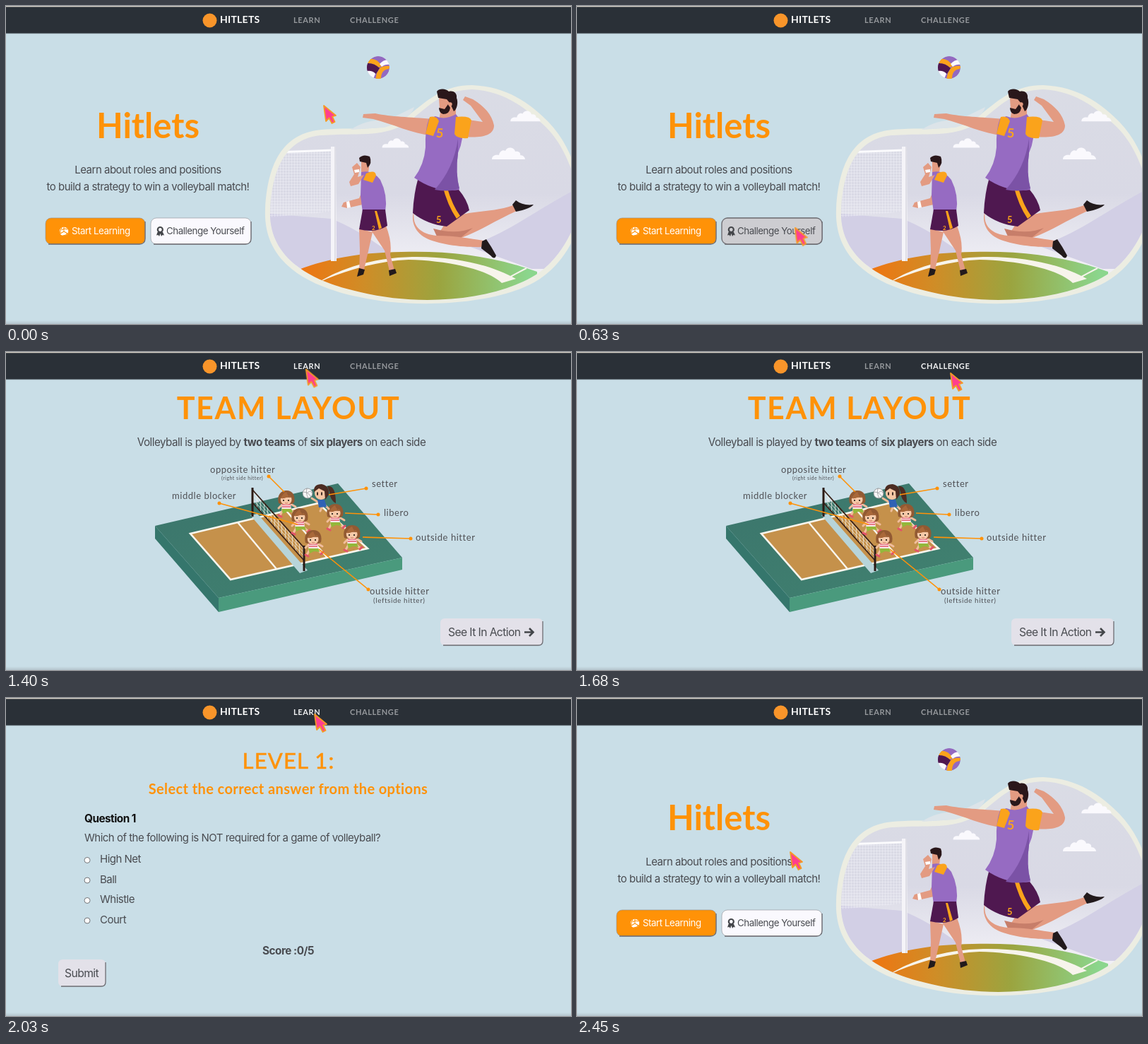
An HTML page for the animation above (2.52 s loop, 800 by 450 pixels).

```html
<!DOCTYPE html>
<html lang="en">
<head>
<meta charset="utf-8">
<title>Volleyball trainer</title>
<style>
html, body { margin: 0; width: 100%; height: 100%; overflow: hidden; background: #c9dee7; }
svg { display: block; width: 100%; height: 100%; }
text { font: 15px Inter, sans-serif; letter-spacing: -.5px; fill: #494b50; white-space: pre; }
.mid { text-anchor: middle; }
.bold, tspan { font-weight: 700; }
.btn { font-size: 13.3px; letter-spacing: -.45px; }
.big { font-size: 15.7px; letter-spacing: -.6px; }
.box { stroke: #8c8c90; stroke-width: .6; }
.edge { fill: none; stroke: #6d6c72; stroke-width: 1.3; }
.head { font-family: Lato, sans-serif; fill: #ff9208; text-anchor: middle; }
.link { font: 700 11px Lato, sans-serif; letter-spacing: .6px; fill: #95989c; }
.label text { font: 13px Lato, sans-serif; letter-spacing: .55px; fill: #505156; }
.label .s { font-size: 10px; }
.label .xs { font-size: 7px; letter-spacing: .45px; }
.skin { fill: #e39b82; }
.jersey { fill: #966bc2; }
.shorts { fill: #4f1850; }
.gold { fill: #fba31b; }
.shoe { fill: #221a1c; }
.hair { fill: #2a171a; }
.num { font: 700 18px Lato, sans-serif; fill: #fba31b; }

.page, .link, #hot, #arrow { animation: 2520ms step-end infinite; }
#home { animation-name: home; }
#quiz { animation-name: quiz; }
#team { animation-name: team; }
#hot { animation-name: hot; }
#learn { animation-name: learn; }
#challenge { animation-name: challenge; }
#arrow { animation-name: arrow; }
@keyframes home { 0%, 94.44% { visibility: visible } 27.77% { visibility: hidden } 100% { visibility: visible } }
@keyframes quiz { 0%, 52.77%, 86.11%, 100% { visibility: hidden } 27.77%, 72.22% { visibility: visible } }
@keyframes team { 0%, 72.22%, 94.44%, 100% { visibility: hidden } 52.77%, 86.11% { visibility: visible } }
@keyframes hot { 0%, 27.77%, 100% { opacity: 0 } 11.11% { opacity: 1 } }
@keyframes learn { 0%, 63.88%, 88.88%, 100% { fill: #95989c } 47.22%, 80.55% { fill: #f1f2f3 } }
@keyframes challenge { 0%, 77.77%, 100% { fill: #95989c } 66.66% { fill: #f1f2f3 } }
/* each leg advances once per 70 ms */
@keyframes arrow {
  0% { transform: translate(450px, 141px); animation-timing-function: steps(2) }
  5.55% { transform: translate(386px, 246px); animation-timing-function: steps(3) }
  13.88% { transform: translate(314px, 337px); animation-timing-function: steps(3) }
  22.22% { transform: translate(311px, 332px); animation-timing-function: steps(2) }
  27.77% { transform: translate(306px, 295px); animation-timing-function: steps(5) }
  41.66% { transform: translate(286px, 149px); animation-timing-function: steps(2) }
  47.22% { transform: translate(420px, 24px); animation-timing-function: steps(5) }
  61.11% { transform: translate(428px, 25px); animation-timing-function: steps(2) }
  66.66% { transform: translate(529px, 30px); animation-timing-function: steps(3) }
  75% { transform: translate(523px, 27px); animation-timing-function: steps(2) }
  80.55% { transform: translate(437px, 23px); animation-timing-function: steps(2) }
  86.11% { transform: translate(432px, 23px); animation-timing-function: steps(2) }
  91.66% { transform: translate(310px, 23px); animation-timing-function: steps(2) }
  97.22% { transform: translate(302px, 218px) }
  100% { transform: translate(450px, 141px) }
}
</style>
</head>
<body>
<svg viewBox="0 0 800 450" preserveAspectRatio="none">
<defs>
  <linearGradient id="floor" x1="408" x2="740" gradientUnits="userSpaceOnUse">
    <stop stop-color="#f2730f"/><stop offset=".3" stop-color="#cf8d27"/>
    <stop offset=".62" stop-color="#9ba43f"/><stop offset="1" stop-color="#8bd68d"/>
  </linearGradient>
  <linearGradient id="sky" x2="0" y2="1">
    <stop stop-color="#dadce5"/><stop offset=".5" stop-color="#d9d9e5"/><stop offset=".8" stop-color="#f0eff5"/>
  </linearGradient>
  <linearGradient id="foot" x2="0" y2="1">
    <stop stop-color="#c9dee7"/><stop offset="1" stop-color="#b4c4cc"/>
  </linearGradient>
  <linearGradient id="slab" x2="1" y2="1">
    <stop stop-color="#3b756c"/><stop offset="1" stop-color="#418270"/>
  </linearGradient>
  <pattern id="mesh" width="4" height="4" patternUnits="userSpaceOnUse">
    <path d="M0 0H4M0 0V4" stroke="#f3f3f8" stroke-width=".9"/>
  </pattern>
  <pattern id="cord" width="5" height="5" patternUnits="userSpaceOnUse" patternTransform="skewY(48)">
    <path d="M0 0H5M0 0V5" stroke="#f2f0e8" stroke-width="1.3"/>
  </pattern>
  <clipPath id="inner"><path d="M374 288C378 214 407 186 447 183 502 179 539 188 575 160 603 137 622 119 660 118 704 120 736 144 762 169 784 190 794 214 802 235V316C789 346 768 371 744 384 681 419 580 424 502 405 423 388 371 352 374 288Z"/></clipPath>
  <clipPath id="disc"><circle r="16"/></clipPath>
  <path id="cloud" d="M-23 8C-23 2-17 1-13 2-12-4-7-6-4-4-1-11 9-9 10-3 16-4 18 0 17 2 21 2 24 5 24 8Z" fill="#faf9fd"/>
  <g id="girl">
    <path d="M-4 10-9 19M4 10 12 17M-6 4-11 9M6 3 13 7" stroke="#f1bd9c" stroke-width="3" stroke-linecap="round"/>
    <path d="M-11 19-7 21M11 18 14 15" stroke="#e2526a" stroke-width="3" stroke-linecap="round"/>
    <path d="M-6 2H6L7 12H-7Z" fill="#f7e9e8"/>
    <path d="M-6 4H6M-6 7H6" stroke="#e5566f" stroke-width="1.5"/>
    <path d="M-7 10H7L9 15 1 14-5 17Z" fill="#93b83a"/>
    <path d="M-11 2C-14-9-8-16 0-16 9-16 13-9 11 1L8 3H-8Z" fill="#925a33"/>
    <path d="M-8-5Q0-7 7-6C9 0 5 4 0 4-6 4-9 0-8-5Z" fill="#f6c9a8"/>
    <path d="M-8-5Q-5-12 0-14 2-7 9-5L5-9Q-1-4-8-5Z" fill="#a9683a"/>
    <circle cx="-4" cy="-2" r="1"/><circle cx="3" cy="-2" r="1"/>
    <path d="M-2 1.5Q0 3 2 1.5" fill="none" stroke="#c75b50" stroke-width=".8"/>
  </g>
</defs>

<rect width="800" height="450" fill="#c9dee7"/>
<rect y="445" width="800" height="5" fill="url(#foot)"/>
<rect width="800" height="39.5" fill="#9fb0b8"/>
<rect width="800" height="38.6" fill="#2a3037"/>
<rect width="800" height="1.3" fill="#dcd7cd"/>
<circle cx="288.5" cy="20.5" r="10" fill="#f9952a"/>
<text x="303" y="24" class="link" style="font-size:14px;fill:#fff;letter-spacing:.25px;animation:none">HITLETS</text>
<text x="407" y="23.5" class="link" id="learn">LEARN</text>
<text x="487" y="23.5" class="link" id="challenge">CHALLENGE</text>

<g id="home" class="page">
  <text x="201" y="187" class="head bold" style="font-size:49px;letter-spacing:0">Hitlets</text>
  <text x="201" y="237" class="mid">Learn about roles and positions</text>
  <text x="201" y="260.5" class="mid">to build a strategy to win a volleyball match!</text>

  <rect class="box" x="56" y="300" width="141" height="37" rx="8" fill="#ff9207"/>
  <path class="edge" d="M60 337H189Q197 337 197 329V305"/>
  <circle cx="82" cy="319" r="6.2" fill="#fff"/>
  <path d="M82 319V313M82 319 77 322M82 319 87 322M79 314Q76 318 77 322M87 316Q82 314 79 317M80 325Q86 325 87 321" fill="none" stroke="#ff9207" stroke-width="1.1"/>
  <text x="93" y="323.3" class="btn" style="fill:#fff">Start Learning</text>

  <rect class="box" x="205" y="300" width="142" height="37" rx="8" fill="#faf9fe"/>
  <path class="edge" d="M209 337H339Q347 337 347 329V305"/>
  <g id="hot" opacity="0">
    <rect x="205" y="300" width="142" height="37" rx="8" fill="#cdcdd1"/>
    <rect class="edge" x="205" y="300" width="142" height="37" rx="8"/>
  </g>
  <path d="M214.5 320 213 324.5 215.5 324 217 326 218.5 322 220 326 221.5 324 224 324.5 222 320Z" fill="#44464a"/>
  <circle cx="218.3" cy="316.5" r="3.5" fill="none" stroke="#44464a" stroke-width="2.2"/>
  <text x="227" y="323.3" class="btn">Challenge Yourself</text>

  <path d="M367 288C371 207 403 179 447 175 501 170 535 182 571 154 601 130 621 112 660 112 710 114 742 138 768 164 790 187 800 211 808 235V318C796 351 773 377 748 391 684 426 566 427 501 412 417 395 364 357 367 288Z" fill="#ecede2"/>
  <path d="M488 175Q510 160 540 161 554 155 578 143 574 160 536 172Z" fill="#dce4e9"/>
  <g clip-path="url(#inner)">
    <path d="M360 100H810V430H360Z" fill="url(#sky)"/>
    <path d="M360 293 460 301Q500 316 552 356L360 382Z" fill="#d2cfe5"/>
    <path d="M810 258C750 288 715 320 655 340L744 372H810Z" fill="#d2cfe5"/>
    <path d="M392 382C455 354 510 349 560 348 630 346 690 354 752 376V430H392Z" fill="url(#floor)"/>
    <path d="M441 392C480 367 530 356 575 355 640 354 690 368 722 386L702 392C680 371 620 360 570 359 525 361 480 374 441 392Z" fill="#f7f4ec"/>
    <path d="M703 389 737 371" stroke="#f7f4ec" stroke-width="2"/>
    <path d="M380 207 462 204V291L372 299Z" fill="url(#mesh)"/>
    <path d="M382 207 463 204" stroke="#fbfbfd" stroke-width="3"/>
    <path d="M460 199H467L468 361H460Z" fill="#f5f4f8"/>
    <path d="M466 199V361" stroke="#c9c9d4"/>
  </g>
  <use href="#cloud" transform="translate(551 194) scale(.8)"/>
  <use href="#cloud" x="711" y="209"/>
  <use href="#cloud" transform="translate(735 156) scale(.9)"/>

  <g transform="translate(527 87)" clip-path="url(#disc)">
    <circle r="16" fill="#9369c0"/>
    <path d="M-13-12Q-2-14 5-2L0 0Q-5-6-15-6Z" fill="#fba31b"/>
    <path d="M-16-6Q-6-7 2 1L-3 9Q-9 4-16 6Z" fill="#4f1850"/>
    <path d="M-16 5Q-8 4-4 9L-7 16-16 14Z" fill="#fbfafd"/>
    <path d="M-2 8 3 0Q9-3 17-2L15 2Q4 3 4 16L-4 17Z" fill="#fba31b"/>
    <path d="M2-5Q8-12 16-11L17-4Q10-5 5-1Z" fill="#fbfafd"/>
  </g>

  <!-- near player -->
  <path class="skin" d="M623 306C650 286 682 295 718 282L723 290C694 303 670 319 645 328L610 326Z"/>
  <path d="M605 315Q637 324 661 314L640 331 610 326Z" fill="#c77e6a"/>
  <path class="skin" d="M578 290C574 312 588 323 610 325 638 325 656 329 676 332L677 341C649 342 613 338 594 328 577 319 573 301 578 290Z"/>
  <path class="shoe" d="M717 281 722 275Q732 283 747 281 742 287 722 291Z"/>
  <path class="shoe" d="M674 333 680 330Q687 340 694 353 692 360 686 353L673 343Z"/>
  <path class="shorts" d="M584 242 641 260Q653 274 656 289L624 312Q596 309 576 293 577 267 584 242Z"/>
  <path class="gold" d="M618 254 625 258Q632 282 643 297L638 301Q625 282 618 254Z"/>
  <path class="skin" d="M605 160C570 157 546 157 523 152L506 153 505 158 520 160C548 167 573 180 605 184Z"/>
  <path class="skin" d="M648 160 675 164 658 141 647 133 650 128 661 132C677 142 688 153 691 169 691 184 672 187 649 185Z"/>
  <path class="skin" d="M616 145H637V162H613Z"/>
  <path class="jersey" d="M608 156Q622 162 637 153L646 165Q649 188 640 208 636 236 642 260 610 265 578 243 592 225 594 200 593 175 599 159Z"/>
  <path d="M640 188Q634 230 607 260 630 264 642 258 636 236 640 208Z" fill="#7b52a6"/>
  <path class="gold" d="M600 157Q610 155 613 163L605 184 594 181Z"/>
  <path class="gold" d="M637 157Q657 155 659 162L654 187Q638 188 635 181Z"/>
  <path class="skin" d="M613 131Q622 123 635 132L634 151Q620 158 614 146Z"/>
  <path class="hair" d="M610 121C614 116 623 117 627 121 635 119 639 125 638 130 641 137 638 147 634 149L629 138 624 132 612 130Z"/>
  <path class="hair" d="M613 144 621 146 626 139 629 144Q628 153 619 153 613 151 613 144Z"/>
  <circle class="skin" cx="629" cy="139" r="2.7"/>
  <text class="num" x="609" y="186" transform="rotate(4 614 180)">5</text>
  <text class="num" x="609" y="307" style="font-size:13px">5</text>

  <!-- far player -->
  <path class="skin" d="M500 315 519 320 513 347 507 373 500 378 501 345Z"/>
  <path class="skin" d="M516 316 538 311Q547 334 544 352L550 374 543 375 536 346Z"/>
  <path class="shoe" d="M500 371 508 373 506 380 497 383Z"/>
  <path class="shoe" d="M542 374 551 372 553 378 543 382Z"/>
  <path class="skin" d="M507 256 500 272 478 278 475 284 483 286 505 281 517 262Z"/>
  <path d="M482 277 486 276 488 285 483 286Z" fill="#fff"/>
  <path class="skin" d="M503 214 515 221 513 236 503 237Z"/>
  <path class="jersey" d="M503 235Q519 231 530 246 541 268 537 291L505 292 502 269Z"/>
  <path class="shorts" d="M505 288H537L540 311Q523 322 500 316Z"/>
  <path class="gold" d="M522 290H525L532 314 528 316Z"/>
  <path class="gold" d="M510 237Q523 231 524 240L519 250 506 246Z"/>
  <path class="skin" d="M507 239 499 252 488 255 486 249 493 238 490 228 497 222 502 228 498 242Z"/>
  <path d="M493 232 500 231 500 235 494 236Z" fill="#fff"/>
  <path class="hair" d="M500 215Q506 209 515 213 519 222 512 229L510 222 501 220Z"/>
  <text class="num" x="518" y="317" style="font-size:8px">2</text>
</g>

<g id="quiz" class="page" visibility="hidden">
  <text x="400" y="100" class="head" style="font-size:31px;letter-spacing:1.2px;stroke:#ff9208;stroke-width:.6px">LEVEL 1:</text>
  <text x="399.5" y="136" class="head bold" style="font-size:20px;letter-spacing:.4px">Select the correct answer from the options</text>
  <text x="111" y="176" class="bold" style="font-size:15.3px;fill:#111">Question 1</text>
  <text x="111" y="203">Which of the following is NOT required for a game of volleyball?</text>
  <g fill="#fff" stroke="#73767a">
    <circle cx="115" cy="229.5" r="4"/><circle cx="115" cy="258" r="4"/>
    <circle cx="115" cy="286.5" r="4"/><circle cx="115" cy="315" r="4"/>
  </g>
  <text x="133" y="233">High Net</text>
  <text x="133" y="261.5">Ball</text>
  <text x="133" y="290">Whistle</text>
  <text x="133" y="318.5">Court</text>
  <text x="399.5" y="363" class="bold mid" style="font-size:15.3px">Score :0/5</text>
  <rect x="74" y="370" width="67" height="38" rx="6" fill="#e3e1e9"/>
  <path class="edge" d="M78 408H135Q141 408 141 402V374"/>
  <text x="83" y="395" class="big">Submit</text>
</g>

<g id="team" class="page" visibility="hidden">
  <text x="400" y="95" class="head bold" style="font-size:43px;letter-spacing:1.6px">TEAM LAYOUT</text>
  <text x="390" y="133" class="mid" style="font-size:15.2px">Volleyball is played by <tspan>two teams</tspan> of <tspan>six players</tspan> on each side</text>

  <path d="M211 246 470 186 561 291 301 348Z" fill="url(#slab)"/>
  <path d="M211 246 301 348V368L211 264Z" fill="#35766c"/>
  <path d="M301 348 561 291V308L301 368Z" fill="#4a9a7d"/>
  <path d="M261 257 442 214 512 278 318 322Z" fill="#c5914b" stroke="#f8f6ee" stroke-width="2.6"/>
  <path d="M328 241 383 307M397 225 455 291" stroke="#f8f6ee" stroke-width="2.4"/>
  <path d="M346 231 356 229 427 309 416 313Z" fill="#b7d4d9"/>
  <path d="M350 196 422 277V295L350 214Z" fill="url(#cord)"/>
  <path d="M349 195 422 277M349 213 422 295" stroke="#3a2219" stroke-width="1.8"/>
  <path d="M349 192V233M422 274V310" stroke="#2b1a15" stroke-width="3"/>

  <use href="#girl" x="397" y="212"/><use href="#girl" x="416" y="237"/>
  <use href="#girl" x="466" y="231"/><use href="#girl" x="490" y="261"/>
  <use href="#girl" x="435" y="268"/>
  <g stroke-linecap="round">
    <path d="M455 190Q467 188 467 214 459 210 458 198Z" fill="#4c2c22"/>
    <path d="M441 212 433 207M448 218 445 225M452 217 457 222" stroke="#eebc98" stroke-width="3"/>
    <path d="M441 209H451L454 219 443 220Z" fill="#2f62b5"/>
    <circle cx="446" cy="200" r="9" fill="#f5c6a4"/>
    <path d="M436 198Q435 187 447 187 458 189 457 202L452 209 451 197 443 193Z" fill="#4c2c22"/>
    <path d="M441 199V202M447 199V202" stroke="#201512" stroke-width="1.7"/>
    <circle cx="427" cy="200" r="7" fill="#f7f7f7" stroke="#8c8d90" stroke-width=".8"/>
    <path d="M421 198Q428 198 432 205M426 193Q424 200 428 207M427 199Q431 195 433 199" fill="none" stroke="#96979a" stroke-width=".8"/>
  </g>

  <g stroke="#ff9208" stroke-width="1.6" fill="none">
    <path d="M372 176 394 198M302 214 413 244M510 193 457 202M527 230 480 228M573 264 505 262M513 336 443 279"/>
    <path d="M372 176h0M302 214h0M510 193h0M527 230h0M573 264h0M513 336h0" stroke-width="5" stroke-linecap="round"/>
  </g>
  <g class="label">
    <text x="289" y="171">opposite hitter</text>
    <text x="305" y="181" class="xs">(right side hitter)</text>
    <text x="235" y="208">middle blocker</text>
    <text x="518" y="191">setter</text>
    <text x="535" y="232">libero</text>
    <text x="580" y="267">outside hitter</text>
    <text x="515" y="343">outside hitter</text>
    <text x="520" y="355" class="s">(leftside hitter)</text>
  </g>
  <rect x="615" y="377" width="145" height="38" rx="6" fill="#e3e1e9"/>
  <path class="edge" d="M619 415H754Q760 415 760 409V381"/>
  <text x="626" y="402" class="big">See It In Action</text>
  <path d="M734 396.5H746M741 391 746.5 396.5 741 402" fill="none" stroke="#44464a" stroke-width="2.6"/>
</g>

<g id="arrow">
  <path d="M0 0 3 22 7.5 17.5 11.5 25 15.5 23 12 15.5 17 14Z" fill="#ff3f8e" stroke="#f59a25" stroke-width="1.8" stroke-linejoin="round"/>
</g>
</svg>
</body>
</html>
```
